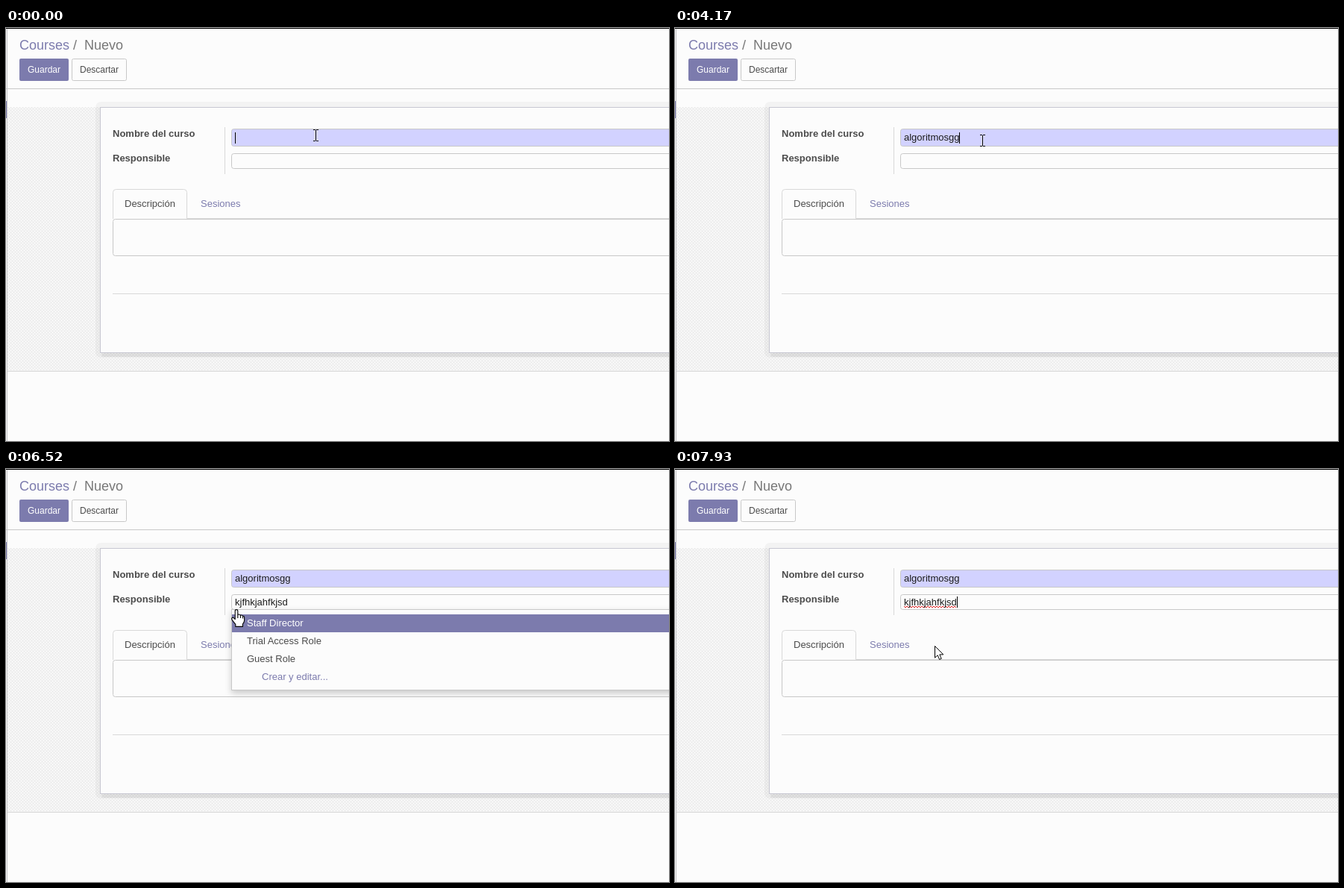
An HTML page that plays this animation: 889 px wide and 554 px high, repeating every 7.99 s.

```html
<!DOCTYPE html>
<html lang="es">
<head>
<meta charset="utf-8">
<title>Nuevo curso</title>
<style>
  html, body { margin: 0; width: 100%; height: 100%; overflow: hidden; background: #fcfcfc; }
  svg { display: block; width: 889px; height: 554px; font: 13px "Liberation Sans", Arial, sans-serif; }
  text { fill: #4c4c4c; white-space: pre; }
  .link { fill: #7c7bad; }
  .bold { font-weight: bold; }
  .typed { fill: #1c1c1c; }
  .box { fill: #fcfcfc; stroke: #c8c8c8; }
  .line { fill: none; stroke: #d9d9d9; }
  .wave { fill: none; stroke: #e02020; }
  .pointer { fill: #fff; stroke: #000; stroke-linejoin: round; }
  .shadow { filter: drop-shadow(0 4px 4px rgba(0, 0, 0, .2)); }
</style>
</head>
<body>
<svg viewBox="0 0 889 554">
  <defs>
    <pattern id="weave" width="4" height="4" patternUnits="userSpaceOnUse">
      <path fill="#fafafa" d="M0 0h4v4H0z"/>
      <path fill="#e6e6e6" d="M0 0h1v1H0zM1 1h1v1H1zM2 2h1v1H2zM3 3h1v1H3zM3 1h1v1H3zM1 3h1v1H1z"/>
    </pattern>
  </defs>

  <rect width="889" height="554" fill="#fcfcfc"/>
  <rect x="2" y="106" width="887" height="354" fill="url(#weave)"/>
  <path class="line" d="M2 460.5H889"/>
  <path d="M0 81.5H889" stroke="#c8c8c8"/>
  <path d="M1.5 1V554" stroke="#c4c4c8"/>
  <rect y="98" width="1" height="23" fill="#7c7bad"/>
  <rect width="889" height="1"/>

  <g font-size="18">
    <text class="link" x="18" y="29">Courses</text>
    <text x="90" y="29" style="fill:#777">/</text>
    <text x="105" y="29" style="fill:#777">Nuevo</text>
  </g>
  <g font-size="12">
    <rect x="18" y="41" width="66" height="30" rx="2" fill="#7c7bad"/>
    <text x="29" y="60" style="fill:#fff">Guardar</text>
    <rect class="box" x="88.5" y="41.5" width="73" height="29" rx="2"/>
    <text x="99" y="60">Descartar</text>
  </g>

  <rect x="120" y="99" width="790" height="343" rx="7" fill="#000" opacity=".035"/>
  <rect x="128" y="436" width="780" height="5" rx="3" fill="#000" opacity=".06"/>
  <rect class="box" x="126.5" y="106.5" width="780" height="329" style="stroke:#c8c8d2"/>

  <text class="bold" x="143" y="146">Nombre del curso</text>
  <text class="bold" x="143" y="179">Responsible</text>
  <path class="line" d="M293.5 133V196"/>
  <rect class="box" x="302.5" y="135.5" width="600" height="23" rx="3" style="fill:#d2d2ff"/>
  <rect class="box" x="302.5" y="168.5" width="600" height="20" rx="3"/>

  <rect class="box" x="143.5" y="256.5" width="760" height="49" rx="3"/>
  <path class="line" d="M143.5 256V220.5q0-4 4-4H238.5q4 0 4 4V255.5H889M143 356.5H889"/>
  <text x="159" y="240">Descripción</text>
  <text class="link" x="261" y="240">Sesiones</text>

  <g id="name"><path class="wave"/><text class="typed" x="307" y="151"></text></g>
  <g id="owner"><path class="wave"/><text class="typed" x="307" y="183"></text></g>
  <g id="menu"></g>
  <rect id="caret" width="1" height="15"/>
  <g id="cursor">
    <g id="beam" fill="none">
      <path stroke="#fff" stroke-width="2" opacity=".5" d="M.5-7V7"/>
      <path stroke="#000" d="M-3-7.5H0M1-7.5H4M-3 7.5H0M1 7.5H4M.5-7V7"/>
    </g>
    <path id="hand" class="pointer" stroke-width="1.1" d="M-1.8 2.2Q-1.8.6 0 .6T1.8 2.2V7.5Q4 6.3 5.4 8.3Q7.4 7.3 8.6 9.2Q10.6 9 10.6 11.5V15Q10.6 17.5 8.4 20V23.4H-1.2V20.4L-5.8 14.6Q-7 12-5.4 11.2Q-4 10.8-1.8 13.6ZM1.8 7.5V12M5.4 8.3V12M8.6 9.2V12.5"/>
    <path id="arrow" class="pointer" d="M.5.5V16.2L4.2 12.8L6.6 18.5L9.2 17.4L6.8 11.9H11.8Z"/>
  </g>
</svg>
<script>
const LOOP = 7990;
const $ = id => document.getElementById(id);

const NAME = 'algoritmosgg';
const NAME_KEYS = [980, 1110, 1480, 1590, 1840, 2020, 2140, 2450, 2640, 2760, 3620, 3740];
const OWNER = 'kjfhkjahfkjsd';
const CARET_OFF = [[250, 800], [3250, 3620], [4240, 4740], [5500, 5560], [6520, 7020]];

const FOCUS_OWNER = 5000, MENU_OPEN = 5500, TYPED = 6030, FILTERED = 6640, MENU_CLOSE = 7640;

// time, x, y of the pointer's hot spot
const PATH = [
  [4110, 415, 144], [4290, 407, 165], [4470, 394, 186], [4760, 377, 180],
  [5130, 377, 180], [5250, 393, 178], [6360, 393, 178], [6520, 309, 188],
  [6580, 301, 191], [6810, 365, 243], [7000, 371, 238], [7160, 376, 224],
  [7280, 400, 212], [7460, 396, 214], [7600, 396, 214], [7930, 348, 237]
];

const within = (t, [from, to]) => t >= from && t < to;

function pointerAt(t) {
  const next = PATH.findIndex(p => p[0] > t);
  if (next === 0) return PATH[0].slice(1);
  if (next < 0) return PATH.at(-1).slice(1);
  const a = PATH[next - 1], b = PATH[next];
  const k = (t - a[0]) / (b[0] - a[0]);
  return [1, 2].map(i => Math.round(a[i] + (b[i] - a[i]) * k));
}

function wave(width, y) {
  let d = `M307 ${y}`;
  for (let x = 2, up = true; x <= width; x += 2, up = !up) d += `L${307 + x} ${y + (up ? 2 : 0)}`;
  return d;
}

// Fills a field and returns the x where its caret belongs.
function setField(id, value, misspelt, waveY) {
  const [line, text] = $(id).children;
  if (text.textContent !== value) text.textContent = value;
  const width = value ? text.getComputedTextLength() : 0;
  line.setAttribute('d', misspelt ? wave(width, waveY) : '');
  return Math.round(307 + width);
}

const people = ['Staff Director', 'Trial Access Role', 'Guest Role'].map(label => ({ label, x: 323 }));
const edit = { label: 'Crear y editar...', x: 343, link: true };
const create = { label: `Crear "<tspan class="bold">${OWNER}</tspan>"`, x: 343, link: true };

function menuMarkup(rows, active) {
  return `<rect class="box shadow" x="302.5" y="188.5" width="620" height="${rows.length * 24 + 12}"/>` +
    `<rect x="303" y="${195 + active * 24}" width="586" height="24" fill="#7c7bad"/>` +
    rows.map((row, i) => `<text x="${row.x}" y="${211 + i * 24}"${row.link ? ' class="link"' : ''}` +
      `${i === active ? ' style="fill:#fff"' : ''}>${row.label}</text>`).join('');
}

let menuState;
function setMenu(t, pointerY) {
  const open = within(t, [MENU_OPEN, MENU_CLOSE]), filtered = t >= FILTERED;
  const active = filtered && pointerY >= 219 ? 1 : 0;
  const state = `${open} ${filtered} ${active}`;
  if (state === menuState) return;
  menuState = state;
  $('menu').innerHTML = open ? menuMarkup(filtered ? [create, edit] : [...people, edit], active) : '';
}

function render(t) {
  const nameLength = NAME_KEYS.filter(key => key <= t).length;
  const progress = Math.min(1, Math.max(0, (t - MENU_OPEN) / (TYPED - MENU_OPEN)));
  const nameEnd = setField('name', NAME.slice(0, nameLength), within(t, [4240, FOCUS_OWNER]), 153.5);
  const ownerEnd = setField('owner', OWNER.slice(0, Math.round(progress * OWNER.length)), t >= 7020, 184);

  const onOwner = t >= FOCUS_OWNER;
  $('caret').setAttribute('x', onOwner ? ownerEnd : nameEnd);
  $('caret').setAttribute('y', onOwner ? 171 : 140);
  $('caret').style.display = CARET_OFF.some(span => within(t, span)) ? 'none' : '';

  const [x, y] = pointerAt(t);
  setMenu(t, y);
  const kind = y < 159 ? 'beam' : y < 168 || t >= MENU_CLOSE ? 'arrow' : 'hand';
  for (const id of ['beam', 'hand', 'arrow']) $(id).style.display = id === kind ? '' : 'none';
  $('cursor').setAttribute('transform', `translate(${x} ${y})`);
}

const start = performance.now();
function tick() {
  render((performance.now() - start) % LOOP);
  requestAnimationFrame(tick);
}
tick();
</script>
</body>
</html>
```
